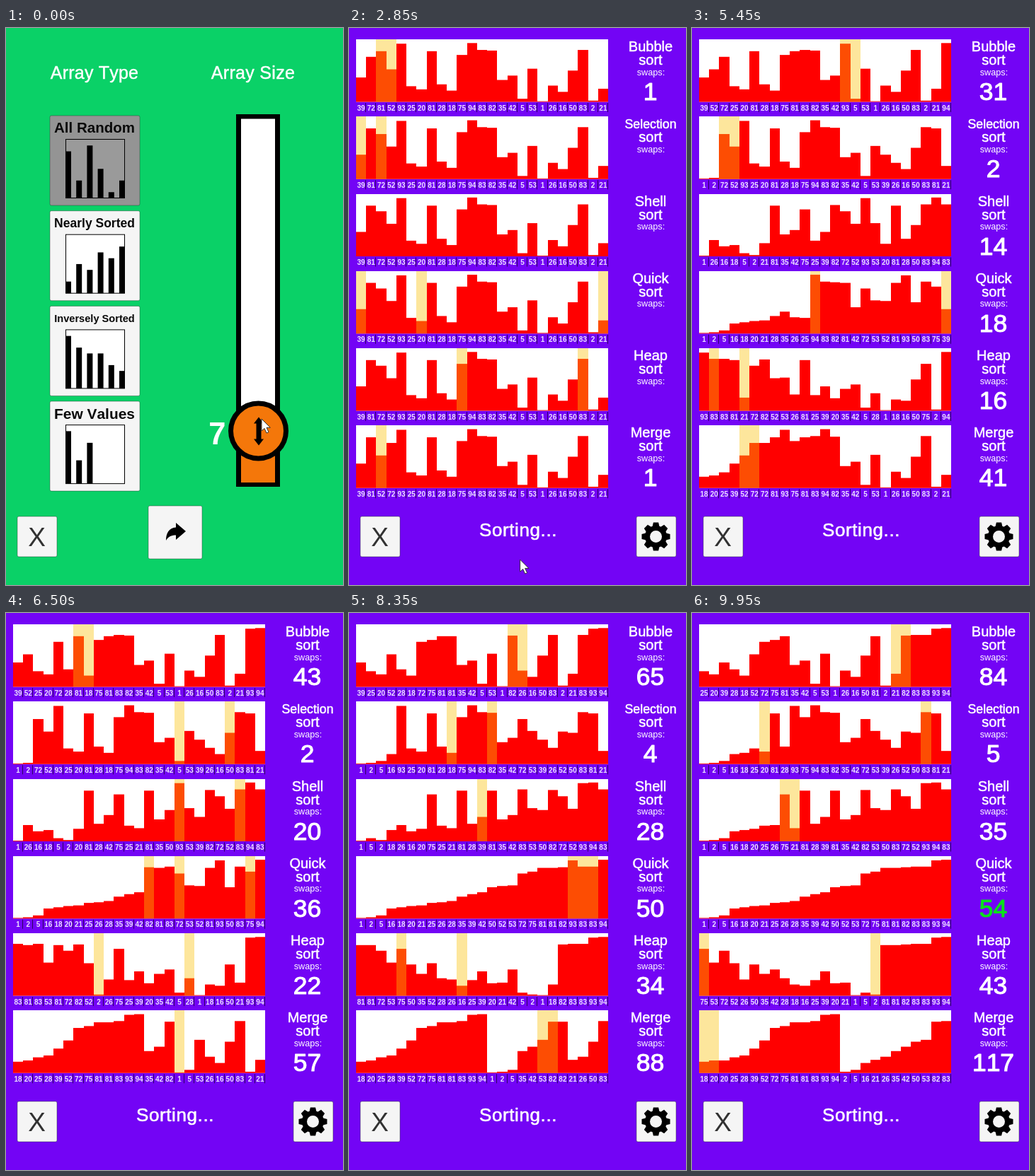
An HTML page with a canvas for the animation above (10 s loop, 476 by 788 pixels).

```html
<!DOCTYPE html>
<html lang="en">
<head>
<meta charset="utf-8">
<title>Sorting race</title>
<style>
  html, body { margin: 0; width: 476px; height: 788px; overflow: hidden; }
  canvas { display: block; }
</style>
</head>
<body>
<canvas id="stage" width="476" height="788"></canvas>
<script>
const g = document.getElementById('stage').getContext('2d');
const LOOP = 10000, SORT_PAGE = 2200, SORT_START = 2700;
const FONT = '"Liberation Sans", Arial, sans-serif';
const ORANGE = '#f4770a';
const DATA = [39, 81, 72, 52, 93, 25, 20, 81, 28, 18, 75, 94, 83,
              82, 35, 42, 5, 53, 1, 26, 16, 50, 83, 2, 21];

/* ---------- sorting: each run is logged as a list of states ---------- */

class Run {
  constructor(sort) {
    this.a = [...DATA];
    this.n = 0;
    this.log = [];
    this.show();
    sort(this, this.a);
    this.show();
  }
  show(...on) { this.log.push({ a: [...this.a], n: this.n, on }); }
  exchange(i, j) {
    [this.a[i], this.a[j]] = [this.a[j], this.a[i]];
    this.n++;
  }
  swap(i, j, ...more) {
    this.show(i, j, ...more);
    this.exchange(i, j);
    this.show(i, j, ...more);
  }
}

function bubble(run, a) {
  for (let end = a.length - 1; end > 0; end--)
    for (let i = 0; i < end; i++)
      if (a[i] > a[i + 1]) run.swap(i, i + 1);
}

function selection(run, a) {
  for (let i = 0; i < a.length - 1; i++) {
    let min = i;
    for (let j = i + 1; j < a.length; j++) {
      run.show(min, j);
      if (a[j] < a[min]) min = j;
    }
    run.exchange(i, min);
  }
}

function shell(run, a) {
  for (let gap = a.length >> 1; gap > 0; gap >>= 1)
    for (let i = gap; i < a.length; i++) {
      let j = i;
      for (; j >= gap && a[j - gap] > a[j]; j -= gap) {
        run.show(j - gap, j);
        run.exchange(j - gap, j);
      }
      if (j < i) run.show(j); else run.show();
    }
}

function quick(run, a, lo = 0, hi = a.length - 1) {
  if (lo >= hi) return;
  const move = (i, j, ...more) => i === j ? run.n++ : run.swap(i, j, ...more);
  let i = lo;
  for (let j = lo; j < hi; j++)
    if (a[j] <= a[hi]) move(i++, j, hi);
  move(i, hi);
  quick(run, a, lo, i - 1);
  quick(run, a, i + 1, hi);
}

function heap(run, a) {
  const sift = (i, size) => {
    let top = i;
    for (const c of [2 * i + 1, 2 * i + 2])
      if (c < size && a[c] > a[top]) top = c;
    if (top === i) return;
    run.swap(i, top);
    sift(top, size);
  };
  for (let i = (a.length >> 1) - 1; i >= 0; i--) sift(i, a.length);
  for (let end = a.length - 1; end > 0; end--) {
    run.swap(0, end);
    sift(0, end);
  }
}

function merge(run, a, lo = 0, hi = a.length - 1) {
  if (lo >= hi) return;
  const mid = (lo + hi) >> 1;
  merge(run, a, lo, mid);
  merge(run, a, mid + 1, hi);
  for (let i = lo, j = mid + 1; i < j && j <= hi; i++) {
    if (a[i] <= a[j]) continue;
    const held = a[j];
    for (let k = j; k > i; k--) {
      run.show(k - 1, k);
      a[k] = a[k - 1];
      run.n++;
    }
    a[i] = held;
    run.show(i);
    run.n++;
    j++;
  }
}

// Pace: at each time, the swap count reached and the states passed since then.
const TIMES = [3950, 5450, 6500, 8350, 9950];
const SORTS = [
  ['Bubble', bubble, [14, 0], [31, 1], [43, 1], [65, 1], [84, 0]],
  ['Selection', selection, [0, 22], [2, 0], [2, 18], [4, 8], [5, 16]],
  ['Shell', shell, [6, 1], [14, 2], [20, 1], [28, 0], [35, 1]],
  ['Quick', quick, [7, 1], [18, 1], [36, 1], [50, 1]],
  ['Heap', heap, [6, 1], [16, 0], [22, 1], [34, 0], [43, 1]],
  ['Merge', merge, [18, 0], [41, 0], [57, 0], [88, 0], [117, 0]]
].map(([name, sort, ...pace]) => {
  const { log } = new Run(sort);
  const marks = pace.map(([n, extra], i) =>
    [TIMES[i], log.findIndex(s => s.n === n) + extra + 0.5]);
  return { name, log, marks: [[SORT_START, 0], ...marks] };
});

function stateAt({ log, marks }, t) {
  let i = 1;
  while (i < marks.length - 1 && t > marks[i][0]) i++;
  const [t0, s0] = marks[i - 1], [t1, s1] = marks[i];
  const step = Math.floor(s0 + (s1 - s0) * (t - t0) / (t1 - t0));
  const at = Math.max(0, Math.min(log.length - 1, step));
  return { ...log[at], done: at === log.length - 1 };
}

/* ---------- drawing helpers ---------- */

function rect(x, y, w, h, color) {
  g.fillStyle = color;
  g.fillRect(x, y, w, h);
}

function text(str, x, y, size, o = {}) {
  const { color = '#fff', align = 'center', bold = '', heavy = 0, gap = 0 } = o;
  g.font = `${bold} ${size}px ${FONT}`;
  g.textAlign = align;
  g.letterSpacing = gap + 'px';
  g.fillStyle = g.strokeStyle = color;
  g.fillText(str, x, y);
  if (heavy) {
    g.lineWidth = heavy;
    g.lineJoin = 'round';
    g.strokeText(str, x, y);
  }
}

function shape(points, color) {
  g.beginPath();
  points.forEach(([x, y]) => g.lineTo(x, y));
  g.closePath();
  g.fillStyle = color;
  g.fill();
}

function button(x, y, w, h, color = '#f5f5f5') {
  g.beginPath();
  g.roundRect(x + 0.5, y + 0.5, w - 1, h - 1, 2);
  g.fillStyle = color;
  g.fill();
  g.strokeStyle = 'rgba(40,60,50,.45)';
  g.lineWidth = 1;
  g.stroke();
}

function closeButton() {
  button(15.5, 690.5, 57, 58);
  text('X', 43.5, 732.5, 37, { color: '#323232' });
}

function gearButton() {
  button(405.5, 690.5, 57, 58);
  g.save();
  g.translate(433.5, 719.5);
  g.strokeStyle = '#000';
  g.lineWidth = 7;
  g.beginPath();
  g.arc(0, 0, 12, 0, 7);
  g.stroke();
  for (let i = 0; i < 8; i++) {
    shape([[-5, -14], [-3.6, -20], [3.6, -20], [5, -14]], '#000');
    g.rotate(Math.PI / 4);
  }
  g.restore();
}

function pointer(x, y) {
  g.save();
  g.translate(x, y);
  shape([[0, 0], [0, 17], [4, 13.4], [7, 20], [10, 18.6], [7, 12.3], [12.3, 12.3]], '#fff');
  g.strokeStyle = '#333';
  g.lineWidth = 1;
  g.stroke();
  g.restore();
}

/* ---------- settings page ---------- */

const TYPES = [
  ['All Random', 20.5, [8, 3, 9, 5, 1, 3]],
  ['Nearly Sorted', 17.5, [2, 5, 4, 7, 6, 8]],
  ['Inversely Sorted', 14.6, [9, 7, 6, 6, 4, 3]],
  ['Few Values', 20.9, [9, 4, 7]]
];

// time, x, y of the pointer tip
const PATH = [[0, 361, 553], [150, 361, 553], [1080, 340, 204], [1450, 340, 204],
              [2000, 238, 712], [2450, 238, 712], [3300, 246, 800]];

function pointerAt(t) {
  let i = 1;
  while (i < PATH.length - 1 && t > PATH[i][0]) i++;
  const [t0, x0, y0] = PATH[i - 1], [t1, x1, y1] = PATH[i];
  const p = Math.min(1, (t - t0) / (t1 - t0));
  const e = p * p * (3 - 2 * p);
  return [x0 + (x1 - x0) * e, y0 + (y1 - y0) * e];
}

function typeButton([label, size, bars], i) {
  const y = 123.5 + i * 134.7, chosen = i === 0;
  button(61.5, y, 128, 128, chosen ? '#949494' : '#f5f5f5');
  text(label, 125, y + 17.5 + size * 0.36, size, { bold: 'bold', color: '#0a0a0a' });
  rect(84, y + 33.5, 84, 84, '#000');
  rect(85, y + 34.5, 82, 82, chosen ? '#9a9a9a' : '#fff');
  bars.forEach((v, k) => rect(84 + k * 15.2, y + 117 - v * 8.25, 8, v * 8.25, '#000'));
}

function slider(value, pressed) {
  const y = 570 - (value - 7) * 19.556, x = 356.5;
  rect(325, 122, 62, 527, '#000');
  rect(332, 128.5, 48, 514.5, '#fff');
  rect(332, y, 48, 643 - y, ORANGE);
  g.beginPath();
  g.arc(x, y, 39, 0, 7);
  g.fillStyle = pressed ? '#c05c06' : ORANGE;
  g.fill();
  g.strokeStyle = '#000';
  g.lineWidth = 7;
  g.stroke();
  const half = [[0, -20], [7, -11], [3.5, -11], [3.5, 11], [7, 11], [0, 20]];
  const arrow = [...half, ...half.map(([px, py]) => [-px, -py])];
  shape(arrow.map(([px, py]) => [x + 0.5 + px, y + 0.5 + py]), '#000');
  text(value, 310.5, y + 18.5, 43.5, { align: 'right', bold: 'bold' });
}

function settingsPage(t) {
  rect(0, 0, 476, 788, '#0ad167');
  text('Array Type', 125, 72, 25, { heavy: 0.5, gap: 0.2 });
  text('Array Size', 349, 72, 25, { heavy: 0.5, gap: 0.3 });
  TYPES.forEach(typeButton);
  const tip = pointerAt(Math.min(t, 1080));
  const value = 7 + Math.round((553 - tip[1]) / 349 * 18);
  slider(value, t >= 100 && t < 1400);
  closeButton();
  button(200.5, 675.5, 77, 76, t > 2080 ? '#c8c8c8' : '#f5f5f5');
  g.fillStyle = '#000';
  g.fill(new Path2D('M254 712 240 700V706.5C230 707 226 715 226 725 230 718.5 235 717.5 240 717.5V724Z'));
}

/* ---------- sorting page ---------- */

const BAR = 356 / 25, UNIT = 0.885;

function panel(sort, row, t) {
  const y = 16 + row * 109.25, base = y + 88.5;
  const { a, n, on, done } = stateAt(sort, t);
  rect(10, Math.round(y), 356, base - Math.round(y), '#fff');
  const edge = i => Math.round(10 + i * BAR);
  a.forEach((v, i) => {
    const x = edge(i), w = edge(i + 1) - x;
    rect(x, base - v * UNIT, w, v * UNIT, '#f00');
    if (on.includes(i)) rect(x, Math.round(y), w, base - Math.round(y), 'rgba(250,192,8,.4)');
    rect(x + w - 1, base + 1.5, 1, 13, 'rgba(0,0,0,.6)');
    text(v, 10 + (i + 0.5) * BAR, y + 100.5, 10, { bold: 'bold', color: '#ece2ff' });
  });
  text(sort.name, 426, y + 17, sort.name.length > 8 ? 17.8 : 20, { heavy: 0.5 });
  text('sort', 426, y + 36, 20, { heavy: 0.5 });
  text('swaps:', 426.5, y + 50.5, 12.7);
  if (n) text(n, 425.5, y + 86, 35.5, { heavy: 1.1, color: done ? '#0be31b' : '#fff' });
}

function sortPage(t) {
  rect(0, 0, 476, 788, '#7304f5');
  SORTS.forEach((sort, row) => panel(sort, row, t));
  text('Sorting...', 239, 718.5, 26, { heavy: 0.6, gap: 0.6 });
  closeButton();
  gearButton();
}

/* ---------- loop ---------- */

g.fontKerning = 'none';
let start;
function frame(now) {
  start ??= now;
  const t = (now - start) % LOOP;
  (t < SORT_PAGE ? settingsPage : sortPage)(t);
  if (t < 3300) pointer(...pointerAt(t));
  requestAnimationFrame(frame);
}
requestAnimationFrame(frame);
</script>
</body>
</html>
```
